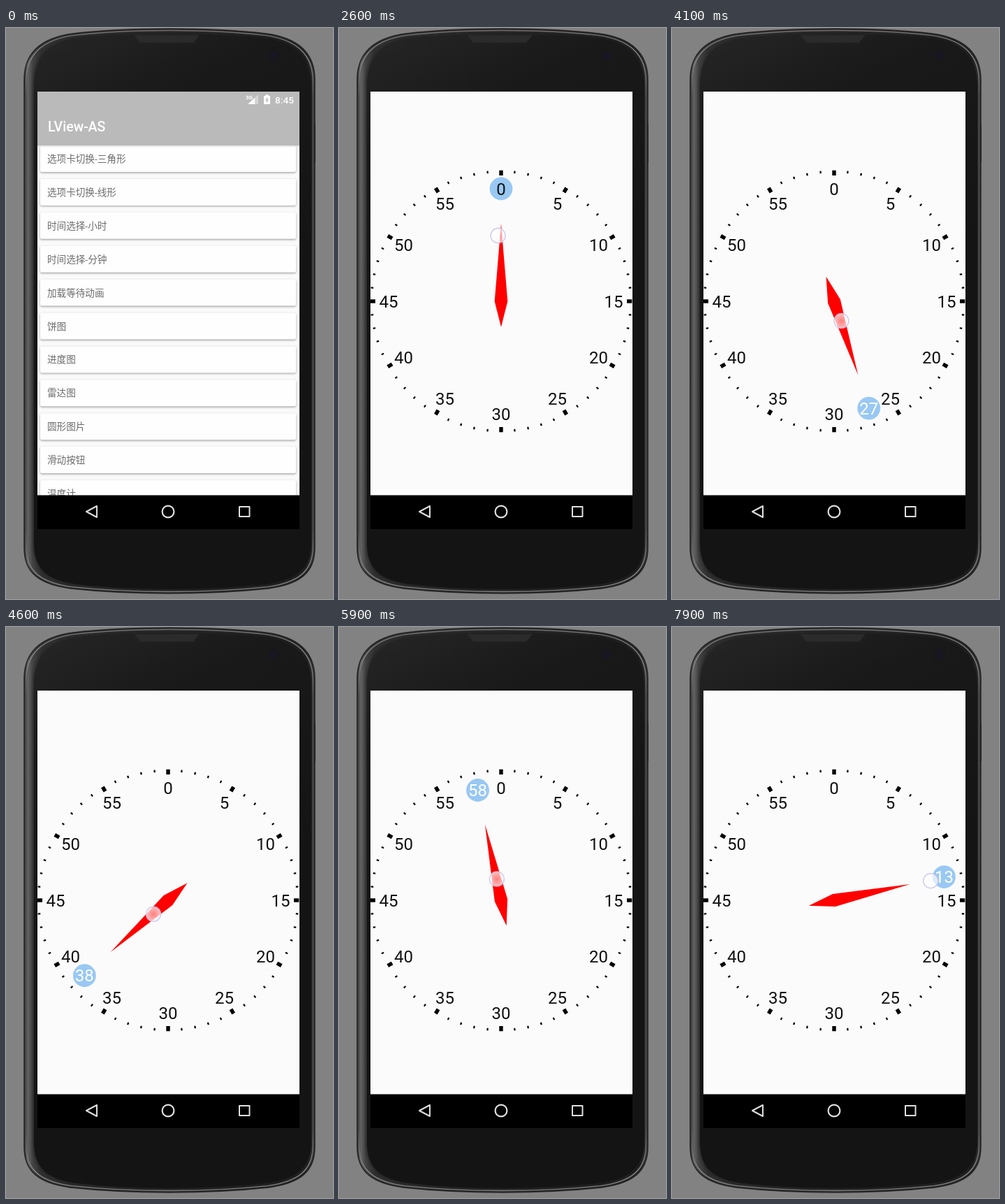
Write an HTML page with a canvas that moves like this. It is 468 px wide and 817 px high and loops after 8000 ms.

```html
<!DOCTYPE html>
<html lang="zh">
<head>
<meta charset="utf-8">
<title>Minute picker</title>
<style>
  html, body { margin: 0; width: 100%; height: 100%; overflow: hidden; background: #828282; }
  canvas { display: block; }
</style>
</head>
<body>
<canvas id="stage" width="468" height="817"></canvas>
<script>
const ctx = document.getElementById('stage').getContext('2d');
const LOOP = 8000, STEP = 100;
const SANS = 'Roboto, "Noto Sans CJK SC", "Noto Sans CJK", sans-serif';
const CX = 232, CY = 391;
const ROWS = ['选项卡切换-三角形', '选项卡切换-线形', '时间选择-小时', '时间选择-分钟', '加载等待动画',
  '饼图', '进度图', '雷达图', '圆形图片', '滑动按钮', '温度计'];

// time, minutes, distance of the finger from the dial centre
const DRAG = [
  [2600, -0.45, 94], [3400, 9, 60], [4000, 23, 34], [4100, 26.6, 30], [4300, 30, 30],
  [4800, 43, 28], [4900, 47, 28], [5100, 49.2, 28], [5200, 51, 28], [5300, 52, 29],
  [5400, 52, 29], [5900, 58.1, 31], [6200, 62, 40], [6300, 61, 45], [6900, 66, 100],
  [7200, 66, 112], [7900, 73.1, 141]
];

function dragAt(t) {
  if (t <= DRAG[0][0]) return DRAG[0].slice(1);
  const i = DRAG.findIndex(key => key[0] >= t);
  if (i < 0) return DRAG[DRAG.length - 1].slice(1);
  const a = DRAG[i - 1], b = DRAG[i], k = (t - a[0]) / (b[0] - a[0]);
  return [1, 2].map(n => a[n] + (b[n] - a[n]) * k);
}

function polar(minute, radius) {
  const angle = minute * Math.PI / 30;
  return [CX + radius * Math.sin(angle), CY - radius * Math.cos(angle)];
}

function rect(x, y, w, h, color) {
  ctx.fillStyle = color;
  ctx.fillRect(x, y, w, h);
}

function disc(x, y, r, fill, stroke, width = 1) {
  ctx.beginPath();
  ctx.arc(x, y, r, 0, Math.PI * 2);
  paint(fill, stroke, width);
}

function poly(points, fill, stroke, width) {
  ctx.beginPath();
  points.forEach(p => ctx.lineTo(...p));
  ctx.closePath();
  paint(fill, stroke, width);
}

function paint(fill, stroke, width) {
  if (fill) { ctx.fillStyle = fill; ctx.fill(); }
  if (stroke) { ctx.strokeStyle = stroke; ctx.lineWidth = width; ctx.stroke(); }
}

function text(str, x, y, font, color, align = 'left') {
  ctx.font = `${font} ${SANS}`;
  ctx.fillStyle = color;
  ctx.textAlign = align;
  ctx.fillText(str, x, y);
}

function gradient(x0, y0, x1, y1, stops) {
  const g = ctx.createLinearGradient(x0, y0, x1, y1);
  stops.forEach(s => g.addColorStop(...s));
  return g;
}

function clipped(x, y, w, h, draw) {
  ctx.save();
  ctx.beginPath();
  ctx.rect(x, y, w, h);
  ctx.clip();
  draw();
  ctx.restore();
}

const BODY = new Path2D(`M26 74 C26 36 50 14 96 8 Q155 1 234 1 Q313 1 372 8 C418 14 442 36 442 74
  V744 C442 780 420 796 376 802 Q310 809 234 809 Q158 809 92 802 C48 796 26 780 26 744 Z`);
const GLASS = new Path2D(`M40 84 C40 44 58 22 104 15 Q162 9 234 9 Q308 9 368 14 C414 20 437 42 437 84
  V736 C437 774 414 791 370 796 Q308 803 234 803 Q162 803 102 796 C58 790 40 774 40 736 Z`);

function drawPhone() {
  rect(0, 0, 468, 817, '#828282');
  rect(440, 138, 3, 54, '#222');

  ctx.save();
  ctx.clip(BODY);
  rect(0, 0, 468, 817, gradient(26, 0, 442, 0,
    [[0, '#2c2c2c'], [0.012, '#636363'], [0.03, '#424242'], [0.06, '#303030'], [0.97, '#222'], [1, '#3c3c3c']]));
  ctx.shadowColor = '#161616';
  ctx.shadowBlur = 6;
  ctx.fillStyle = gradient(40, 9, 250, 420, [[0, '#262626'], [0.35, '#191919'], [1, '#141414']]);
  ctx.fill(GLASS);
  ctx.restore();

  ctx.strokeStyle = '#242424';
  ctx.lineWidth = 1.5;
  ctx.stroke(BODY);

  // bright glints on the curved ends only
  ctx.save();
  ctx.translate(234, 405);
  ctx.scale(0.987, 0.994);
  ctx.translate(-234, -405);
  ctx.strokeStyle = gradient(0, 0, 0, 817,
    [[0, '#6c6c6c'], [0.05, '#8c8c8c'], [0.12, '#505050'], [0.88, '#505050'], [0.96, '#8c8c8c'], [1, '#777']]);
  ctx.stroke(BODY);
  ctx.restore();

  poly([[183, 10], [277, 10], [268, 21], [192, 21]], '#2b2b2b', '#242424', 1);
  disc(74, 40, 5, '#222');
  disc(88, 40, 5, '#222');
  disc(383, 39, 8, '#17171d');
  disc(383, 39, 4, '#181824');
}

function drawNav() {
  const icon = '#dedede';
  rect(45, 668.5, 375, 48.5, '#000');
  ctx.lineJoin = 'round';
  poly([[115, 692], [130, 684], [130, 700]], null, icon, 2);
  disc(232, 692, 8.4, null, icon, 2.2);
  ctx.strokeStyle = icon;
  ctx.lineWidth = 2;
  ctx.strokeRect(334, 685, 14.5, 14);
}

function drawList() {
  rect(45, 91, 375, 578, '#fafafa');
  ROWS.forEach((label, i) => {
    const y = 187 + i * 47.9;
    ctx.save();
    ctx.shadowColor = 'rgba(0,0,0,.38)';
    ctx.shadowBlur = 3;
    ctx.shadowOffsetY = 1.2;
    ctx.beginPath();
    ctx.roundRect(49, y - 19, 366, 38, 2.5);
    paint('#fefefe');
    ctx.restore();
    text(label, 59, y + 5, '13.6px', '#6c6c6c');
  });
  rect(45, 91, 375, 77, '#bababa');
  rect(45, 168, 375, 3, gradient(0, 168, 0, 171, [[0, 'rgba(0,0,0,.14)'], [1, 'rgba(0,0,0,0)']]));
  text('LView-AS', 60, 148, '500 19.5px', '#fff');

  text('3G', 343, 102, 'bold 8px', '#fff');
  poly([[346, 109], [361, 109], [361, 95]], 'rgba(255,255,255,.4)');
  poly([[346, 109], [356, 109], [356, 100]], '#fff');
  rect(371.5, 95.5, 4, 2, '#fff');
  rect(369, 97, 9, 12, '#fff');
  poly([[374.5, 98.5], [371, 103.5], [373, 103.5], [372.5, 107.5], [376, 102.5], [374, 102.5]], '#bababa');
  text('8:45', 412, 108, '500 13.7px', '#fff', 'right');
}

function drawDial(value) {
  rect(45, 91, 375, 578, '#fbfbfb');
  for (let m = 0; m < 60; m++) {
    const major = m % 5 === 0;
    ctx.beginPath();
    ctx.moveTo(...polar(m, 187.3));
    ctx.lineTo(...polar(m, major ? 180 : 183.8));
    paint(null, '#000', major ? 5.4 : 2.2);

    const [x, y] = polar(m, 161);
    if (m === value) disc(x, y, 16.4, '#99c8f3');
    if (major || m === value) text(m, x, y + 8.5, '24px', major ? '#111' : '#fff', 'center');
  }
  poly([polar(value, 111), polar(value + 15, 9.3), polar(value, -37), polar(value - 15, 9.3)], '#f00');
}

function drawTouch(x, y) {
  const glow = ctx.createRadialGradient(x, y, 0, x, y, 10.5);
  glow.addColorStop(0, 'rgba(255,255,255,.5)');
  glow.addColorStop(1, 'rgba(255,255,255,.75)');
  disc(x, y, 10.5, glow, 'rgba(200,196,236,.85)', 1.5);
}

function render(now) {
  const t = Math.floor(now % LOOP / STEP) * STEP;
  const [minutes, reach] = dragAt(t);
  const value = (Math.round(minutes) + 60) % 60;

  drawPhone();
  if (t < 1900) clipped(45, 91, 375, 578, drawList);
  if (t >= 1900) clipped(45, 91, 375, 578, () => drawDial(value));
  drawNav();
  if (t >= 1500 && t < 1700) drawTouch(225, 331);
  if (t === 1800) {
    // the new screen slides up while it fades in
    clipped(45, 100, 375, 578, () => {
      ctx.globalAlpha = 0.93;
      ctx.translate(0, 9);
      drawDial(value);
    });
  }
  if ((t >= 2600 && t < 7000) || t >= 7300) drawTouch(...polar(minutes, reach));
}

function tick() {
  render(performance.now());
  requestAnimationFrame(tick);
}
tick();
</script>
</body>
</html>
```
